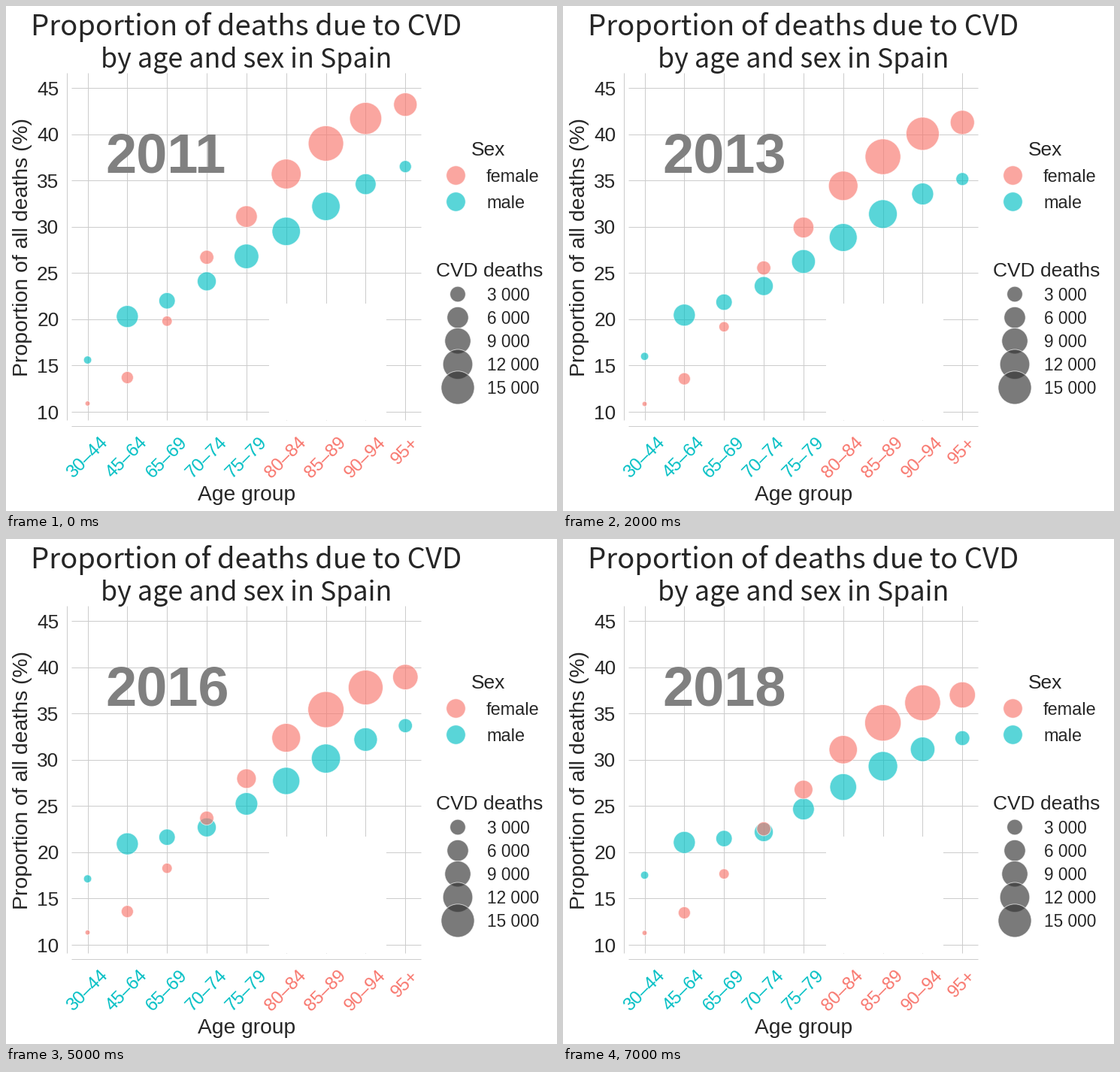
A matplotlib script for the animation above (8 s loop, 733 by 672 pixels).

```python
import numpy as np
import matplotlib.pyplot as plt
from matplotlib.animation import FuncAnimation
from matplotlib.patches import Rectangle

W, H, DPI = 733, 672, 64
PT = 72 / DPI  # points per pixel
INK, GRID, GREY = "#262626", "#cccccc", "#808080"
RED, TEAL = "#F8766D", "#00BFC4"
ALPHA = 0.65
FIRST_YEAR, N_YEARS = 2011, 8
AGES = ["30–44", "45–64", "65–69", "70–74", "75–79",
        "80–84", "85–89", "90–94", "95+"]
K = np.arange(len(AGES))
XS = 108.55 + 52.84 * K

# First-year shares (%) and bubble diameters (px)
FEMALE = [10.9, 13.7, 19.8, 26.7, 31.1, 35.7, 39.0, 41.7, 43.2]
MALE = [15.6, 20.3, 22.0, 24.1, 26.8, 29.5, 32.2, 34.6, 36.5]
FEMALE_D = [6, 15.5, 13, 18, 28, 39, 46.3, 42, 30.5]
MALE_D = [10, 28.5, 21, 24.5, 32, 37, 37, 27, 15.5]

# Yearly change, set at a few ages; the swing is widest at both age ends
FEMALE_TREND = np.interp(K, [0, 1, 3, 8], [0.16, 0.01, -0.62, -0.78])
MALE_TREND = np.interp(K, [0, 3, 8], [0.38, -0.30, -0.49])
GROWTH = np.interp(K, [3, 4, 5, 7, 8], [0, -0.55, -0.3, 0.7, 0.5])
SWING = 0.24 - 0.061 * (K - 4) ** 2

plt.rcParams["font.family"] = "Liberation Sans"
fig = plt.figure(figsize=(W / DPI, H / DPI), dpi=DPI, facecolor="white")
ax = fig.add_axes([0, 0, 1, 1])
ax.set(xlim=(0, W), ylim=(H, 0))
ax.axis("off")


def label(x, y, text, size, color=INK, ha="center", va="baseline", **kw):
    return ax.text(x, y, text, fontsize=size * PT, color=color,
                   ha=ha, va=va, zorder=5, **kw)


def line(x0, y0, x1, y1):
    ax.plot([x0, x1], [y0, y1], color=GRID, lw=PT, zorder=1,
            solid_capstyle="butt")


def height(pct):
    return 663.15 - 12.314 * np.asarray(pct)


def area(d):
    return ((np.asarray(d) + 0.6) * PT) ** 2


def bubbles(color, zorder=3):
    return ax.scatter([], [], c=color, alpha=ALPHA, edgecolors="white",
                      linewidths=PT, zorder=zorder)


def place(dots, x, y, d):
    d = np.asarray(d)
    x = np.broadcast_to(x, d.shape)
    y = np.broadcast_to(y, d.shape)
    dots.set_offsets(np.column_stack([x, y]))
    dots.set_sizes(area(d))


# Titles
title = dict(family="Noto Sans CJK JP")
label(319.5, 39, "Proportion of deaths due to CVD", 38.2, **title)
label(320, 82, "by age and sex in Spain", 35.9, **title)
label(320, 657.5, "Age group", 28.2)
label(29, 320.7, "Proportion of all deaths (%)", 28.4,
      rotation=90, rotation_mode="anchor")

# Grid, spines and ticks
for k, age in enumerate(AGES):
    line(XS[k], 89, XS[k], 551)
    label(XS[k], 570, age, 24, TEAL if k < 5 else RED, va="top", rotation=45)
for pct in range(10, 50, 5):
    y = height(pct)
    line(87, y, 552, y)
    label(70.5, y + 9.5, str(pct), 26.2, ha="right")
line(81.2, 89, 81.2, 551)
line(87, 558.8, 552, 558.8)
ax.add_patch(Rectangle((350, 396), 156, 155, color="white", lw=0, zorder=2))

# Legends
label(642, 199, "Sex", 26.4)
for y, name, color in [(225.3, "female", RED), (260.3, "male", TEAL)]:
    place(bubbles(color), 597.5, y, [25])
    label(639, y + 8.7, name, 23.5, ha="left")
label(643, 360.5, "CVD deaths", 26.4)
key_y = 383.5 + 31.1 * np.arange(5)
keys = bubbles("#333333")
key_text = [label(640, y + 8.2, "", 22.6, ha="left") for y in key_y]

# Moving parts
male = bubbles(TEAL)
female = bubbles(RED, zorder=4)
year_text = label(132.5, 221.5, "", 74, GREY, ha="left", weight="bold")


def draw(t):
    year_text.set_text(str(FIRST_YEAR + t))
    swing = SWING * (0, 1, 0.5)[t % 3]
    for dots, share, trend, d in [(male, MALE, MALE_TREND, MALE_D),
                                  (female, FEMALE, FEMALE_TREND, FEMALE_D)]:
        place(dots, XS, height(share + trend * t + swing), d + GROWTH * t)

    # The size key has coarser steps in two of the years
    step, count = (4, 4) if t in (1, 4) else (3, 5)
    thousands = step * np.arange(1, count + 1)
    place(keys, 601, key_y[:count], np.sqrt(30 + 124.4 * thousands))
    for k, text in enumerate(key_text):
        text.set_text(f"{thousands[k]} 000" if k < count else "")
    return male, female, year_text, keys, *key_text


anim = FuncAnimation(fig, draw, frames=N_YEARS, interval=1000,
                     repeat=True, repeat_delay=0, blit=False)
plt.show()
```
